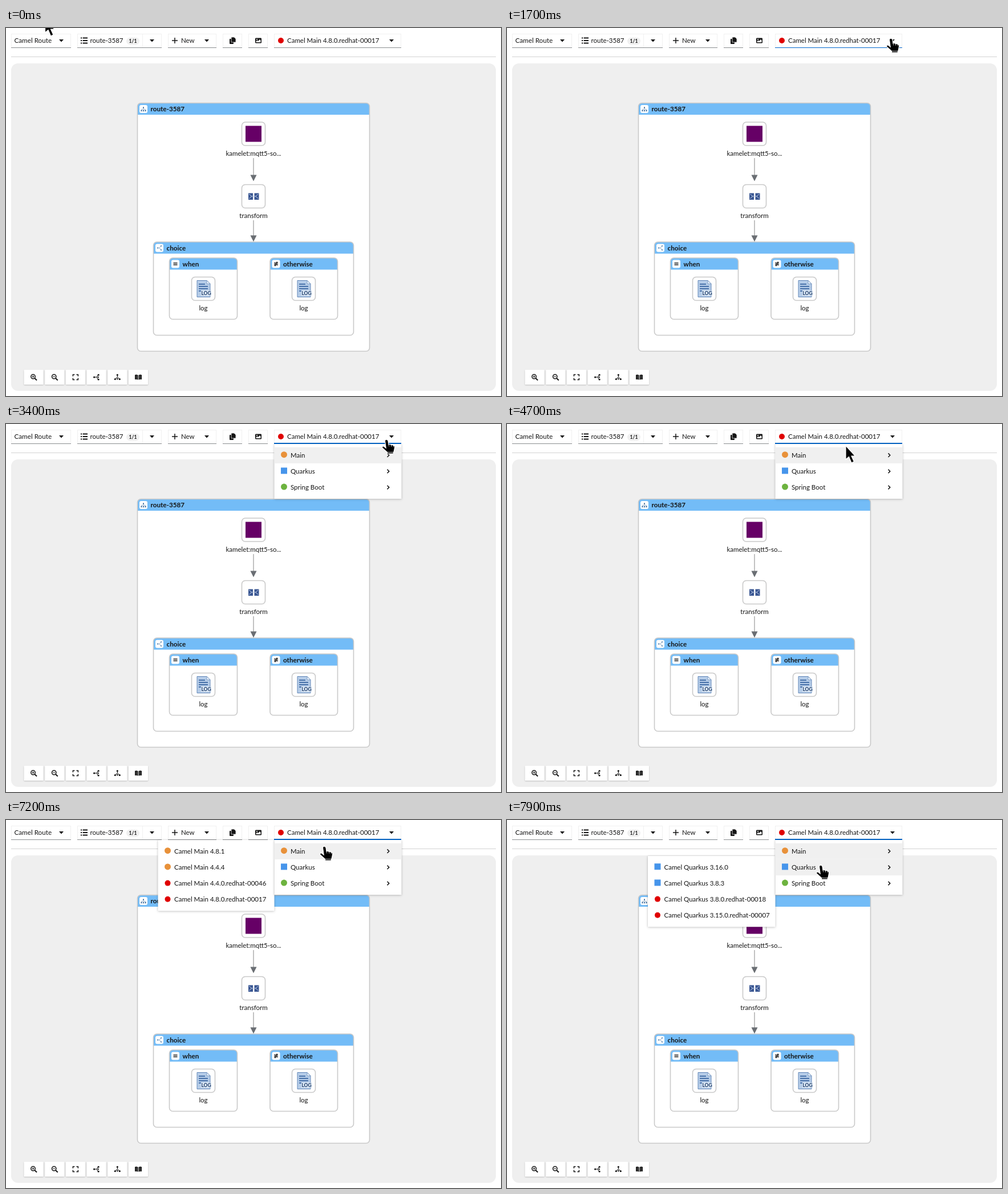
An HTML page for the animation above (8000 ms loop, 868x645 px).

```html
<!DOCTYPE html>
<html lang="en">
<head>
<meta charset="utf-8">
<title>Route designer</title>
<style>
html, body { margin: 0; width: 100%; height: 100%; overflow: hidden; background: #fff; }
svg { display: block; font: 11.5px Lato, "Open Sans", sans-serif; fill: #151515; }
.b { font-weight: 700; }
.mid { text-anchor: middle; }
.line { fill: none; stroke: #151515; stroke-width: 1.5; }
.menu { filter: drop-shadow(0 1.5px 2px #0303032e) drop-shadow(0 0 1px #03030320); }
</style>
</head>
<body>
<svg id="stage" width="868" height="645" viewBox="0 0 868 645"></svg>
<script>
const rect = (x, y, w, h, fill, more = '') =>
  `<rect x="${x}" y="${y}" width="${w}" height="${h}" fill="${fill}" ${more}/>`;
const path = (d, more = '') => `<path d="${d}" ${more}/>`;
const line = (d, more = '') => path(d, `class="line" ${more}`);
const text = (x, y, s, more = '') => `<text x="${x}" y="${y}" ${more}>${s}</text>`;
const dot = (x, y, r, fill) => `<circle cx="${x}" cy="${y}" r="${r}" fill="${fill}"/>`;
const at = (x, y, s) => `<g transform="translate(${x} ${y})">${s}</g>`;
const group = (id, s) => `<g id="${id}" visibility="hidden">${s}</g>`;
const caret = x => path(`M${x - 4} 20h8l-4 4.5z`);

// Plain marks for the runtimes, centred on x, y
const marks = {
  main: (x, y) => dot(x, y, 5.5, '#e8913a'),
  quarkus: (x, y) => rect(x - 5.5, y - 5.5, 11, 11, '#4695eb'),
  spring: (x, y) => dot(x, y, 5.5, '#6db33f'),
  vendor: (x, y) => dot(x, y + .5, 5, '#e00000')
};

function toggle(x, w) {
  return rect(x + .5, 10.5, w - 1, 24, '#fff', 'stroke="#f0f0f0"') +
    rect(x, 34, w, 1, '#8a8d90');
}

function toolbar() {
  const list = [17.5, 22, 26.5].map(y => rect(131, y - 1, 2, 2, '#151515') +
    rect(134.5, y - 1, 8.5, 2, '#151515')).join('');
  return toggle(9, 105) + text(14.5, 26, 'Camel Route', 'font-size="11.7"') + caret(97) +
    toggle(125, 148) + rect(239, 10, 1, 24, '#f0f0f0') + list +
    text(147.5, 26, 'route-3587') + caret(256) +
    rect(211, 16.5, 23, 13, '#f0f0f0', 'rx="6.5"') +
    text(222.5, 26, '1/1', 'class="mid b" font-size="8.5"') +
    toggle(284, 85) + line('M291 22h10M296 17v10', 'stroke-width="2"') +
    text(307, 26, 'New') + caret(352) +
    toggle(380, 34) + rect(392, 19, 7, 9, '#151515', 'rx="1"') +
    path('M395 16h5l3 3v6h-8z', 'stroke="#fff" stroke-width=".7"') +
    toggle(425, 34) + rect(437, 17.5, 11, 9, '#151515', 'rx="1.2"') +
    path('M438.5 25v-1.5l2-2 1.5 1.5 3-3 1.5 1.5V25z', 'fill="#fff"') + dot(440, 20, 1, '#fff') +
    toggle(470, 223) + marks.vendor(482, 21.5) +
    text(493, 26, 'Camel Main 4.8.0.redhat-00017') + caret(676) +
    `<rect id="under" x="470" width="223" fill="#06c"/>` +
    rect(9, 50, 850, 1, '#d2d2d2');
}

function box(x, y, w, h, name, icon) {
  return rect(x, y, w, h, '#fff', 'rx="6"') +
    path(`M${x} ${y + 20.5}v-14.5q0-6 6-6h${w - 12}q6 0 6 6v14.5z`, 'fill="#73bcf7"') +
    rect(x, y, w, h, 'none', 'rx="6" stroke="#c9c9c9" stroke-width="1.6"') +
    rect(x + 3.5, y + 3.5, 14, 14, '#fff', 'rx="3"') +
    at(x + 10.5, y + 10.5, icon) + text(x + 23, y + 14.5, name, 'class="b" font-size="11.7"');
}

function node(cx, y, label, icon) {
  return rect(cx - 20.5, y, 41, 41, '#fff', 'rx="6" stroke="#c9c9c9" stroke-width="1.6"') +
    at(cx, y + 20.5, icon) + text(cx, y + 58.5, label, 'class="mid"');
}

const arrow = (y, end) => line(`M434 ${y}V${end - 10}`, 'style="stroke:#999;stroke-width:1.2"') +
  path(`M428.5 ${end - 11}h11l-5.5 11z`, 'fill="#6a6e73"');

const logIcon = path('M-11-14.5H6l6 6V14.5H-11z', 'fill="#b5cce8" stroke="#6488b8"') +
  path('M6-14.5v6h6z', 'fill="#e9f1fa" stroke="#6488b8" stroke-width=".7"') +
  [-9, -5, -1, 3].map((y, i) => rect(-8, y, i ? 16 : 11, 1.8, '#3d69a4')).join('') +
  rect(-4, 3, 18, 9.5, '#dce8f5') +
  text(5, 11, 'LOG', 'class="mid b" font-size="8.5" fill="#173766"');

const transformIcon = rect(-9, -5.5, 8, 11.5, '#385591') + rect(1.5, -5.5, 8, 11.5, '#385591') +
  path('M-8-4l4 3v2l-4 3M8.5-4l-4 3v2l4 3M-4 0h8', 'fill="none" stroke="#b9c8e4"');

const treeIcon = rect(-1, -3.5, 2, 2, '#2b5f94') +
  path('M0-1.5v2M-3.5 2.5v-2h7v2', 'fill="none" stroke="#7b9cbd" stroke-width=".8"') +
  [-4.5, -1, 2.5].map(x => rect(x, 2, 2, 2, '#2b5f94')).join('');
const forkIcon = path('M-4 0h4M0 0l3-3.5M0 0l3 3.5', 'fill="none" stroke="#7b9cbd" stroke-width=".9"') +
  [-3.5, 0, 3.5].map(y => dot(y ? 3 : -3, y, .9, '#2b5f94')).join('');
const equalsIcon = 'M-3.5-1.5h7M-3.5 1.5h7';

function diagram() {
  return rect(9, 62, 850, 574, '#efefef', 'rx="12"') +
    box(230.5, 131.5, 407, 435, 'route-3587', treeIcon) +
    box(258.5, 375, 351, 163.5, 'choice', forkIcon) +
    box(286.5, 403, 119, 107.5, 'when', line(equalsIcon, 'stroke-width="1"')) +
    box(463, 403, 118.5, 107.5, 'otherwise', line(equalsIcon + 'M2-4l-4 8', 'stroke-width="1"')) +
    arrow(228, 268.5) + arrow(337, 374.5) +
    node(434, 165, 'kamelet:mqtt5-so...', rect(-14, -14, 28, 28, '#660066')) +
    node(434, 274.5, 'transform', transformIcon) +
    node(346, 436.5, 'log', logIcon) + node(522, 436.5, 'log', logIcon);
}

function controls() {
  const lens = '<circle cx="-1" cy="-1" r="3.7" class="line"/>' + line('M2 2l3.5 3.5', 'style="stroke-width:2"');
  const legs = line('M0-4V0M0 0l-4 3M0 0l4 3', 'style="stroke-width:1"') +
    dot(0, -4, 1.6, '#151515') + dot(-4, 3.5, 1.6, '#151515') + dot(4, 3.5, 1.6, '#151515') + dot(0, 3, 1.3, '#151515');
  const icons = [
    lens + line('M-3-1h4M-1-3v4', 'style="stroke-width:1"'),
    lens + line('M-3-1h4', 'style="stroke-width:1"'),
    line('M-4.5-1.5v-3h3M1.5-4.5h3v3M4.5 1.5v3h-3M-1.5 4.5h-3v-3'),
    `<g transform="rotate(-90)">${legs}</g>`,
    legs,
    path('M-6-4q3-1 5.5.5v8Q-3 3.500-6 4zM6-4q-3-1-5.500.5v8Q3 3.500 6 4z') +
      line('M-4-3v6M-2-3v6M2-3v6M4-3v6', 'style="stroke:#777;stroke-width:.6"')
  ];
  return icons.map((icon, i) => at(48.5 + i * 36.7, 612,
    rect(-17, -13, 34, 26, '#fff', 'rx="1" style="filter:drop-shadow(0 1px 1px #0003)"') + icon)).join('');
}

// Rows are 28.2 px high; each is [mark, label]
function menu(x, y, w, rows, sub) {
  return rect(x, y, w, rows.length * 28.2 + 11.5, '#fff', 'class="menu"') +
    rows.map(([mark, label], i) => {
      const cy = y + 19.7 + i * 28.2;
      return (sub ? `<rect class="row" x="${x}" y="${cy - 14}" width="${w}" height="28.2" fill="none"/>` : '') +
        marks[mark](x + 17, cy - 1) + text(x + 28.5, cy + 4, label) +
        (sub ? line(`M668.500 ${cy - 3.3}l3.300 3.300-3.300 3.300`) : '');
    }).join('');
}

const pointer = path('M0 0V24L5.5 19.500 10 30 14.500 28 10 18H16.500Z', 'fill="#000" stroke="#fff" stroke-width="1.2"');
const hand = path('M-2.500 2.500C-2.500-.7 2.300-.7 3 2.500L4 9C6 8 8 8.500 8.500 10 10 9 12 9.500 12.300 11 14 10.500 15 12 14.600 14L13.500 20 12 25H1.500V22.500L-7 15C-8.500 13-6 11-4 12.500L-.8 15Z',
  'fill="#000" stroke="#fff" stroke-width="1.2"') +
  path('M4.300 9.500l.5 3M8.500 10.500l.4 2.500M12.300 11.500l.2 2M2 22.500h10.500', 'fill="none" stroke="#fff" stroke-width=".7"');

const $ = id => document.getElementById(id);
$('stage').innerHTML = diagram() + controls() + toolbar() +
  group('mainSub', menu(266.5, 35, 204, [
    ['main', 'Camel Main 4.8.1'], ['main', 'Camel Main 4.4.4'],
    ['vendor', 'Camel Main 4.4.0.redhat-00046'], ['vendor', 'Camel Main 4.8.0.redhat-00017']])) +
  group('quarkusSub', menu(247, 63, 223.5, [
    ['quarkus', 'Camel Quarkus 3.16.0'], ['quarkus', 'Camel Quarkus 3.8.3'],
    ['vendor', 'Camel Quarkus 3.8.0.redhat-00018'], ['vendor', 'Camel Quarkus 3.15.0.redhat-00007']])) +
  group('runtimes', menu(470.5, 35, 223, [
    ['main', 'Main'], ['quarkus', 'Quarkus'], ['spring', 'Spring Boot']], true)) +
  `<g id="cursor">${group('pointer', pointer)}${group('hand', hand)}</g>`;

// Cursor stops: time, x, y
const stops = [
  [0, 68.5, -16], [300, 68.5, -16], [400, 71, -14], [500, 71, -14], [700, 68, -14],
  [800, 68, -14], [1000, 180, -10], [1200, 520, 4], [1400, 692, 15], [1600, 692, 15],
  [1700, 673, 18], [1900, 646, 25], [2000, 646, 25], [2100, 645, 24], [2400, 688, 16],
  [2700, 670, 28], [3300, 670, 28], [3400, 667, 27], [4400, 667, 27], [4500, 640, 32],
  [4700, 594, 38], [4800, 582, 41], [5000, 565, 45], [5100, 565, 45], [5300, 556, 46],
  [5500, 562, 45], [7100, 562, 45], [7200, 558, 46], [7400, 557, 43], [7600, 555, 60],
  [7900, 550, 79], [8000, 550, 79]
];

function cursorAt(t) {
  const i = stops.findIndex(s => s[0] > t);
  const [t0, x0, y0] = stops[i - 1], [t1, x1, y1] = stops[i];
  const k = (t - t0) / (t1 - t0);
  return [x0 + (x1 - x0) * k, y0 + (y1 - y0) * k];
}

const show = (id, on) => $(id).setAttribute('visibility', on ? 'visible' : 'hidden');
const rows = document.querySelectorAll('.row');
rows[0].setAttribute('fill', '#f0f0f0');

function frame() {
  const t = Math.floor(performance.now() % 8000 / 100) * 100;
  const [x, y] = cursorAt(t);
  const over = x > 470 && (y > 9 && y < 35.5 || y > 40);
  const open = t >= 2900;
  show('runtimes', t >= 3100);
  show('mainSub', t >= 5000 && t < 7800);
  show('quarkusSub', t >= 7800);
  rows[1].setAttribute('fill', t >= 7700 ? '#f0f0f0' : 'none');
  show('under', open || over);
  $('under').setAttribute('y', open ? 33 : 34);
  $('under').setAttribute('height', open ? 2 : 1);
  show('hand', over);
  show('pointer', !over);
  $('cursor').setAttribute('transform', `translate(${x} ${y})`);
  requestAnimationFrame(frame);
}
frame();
</script>
</body>
</html>
```
